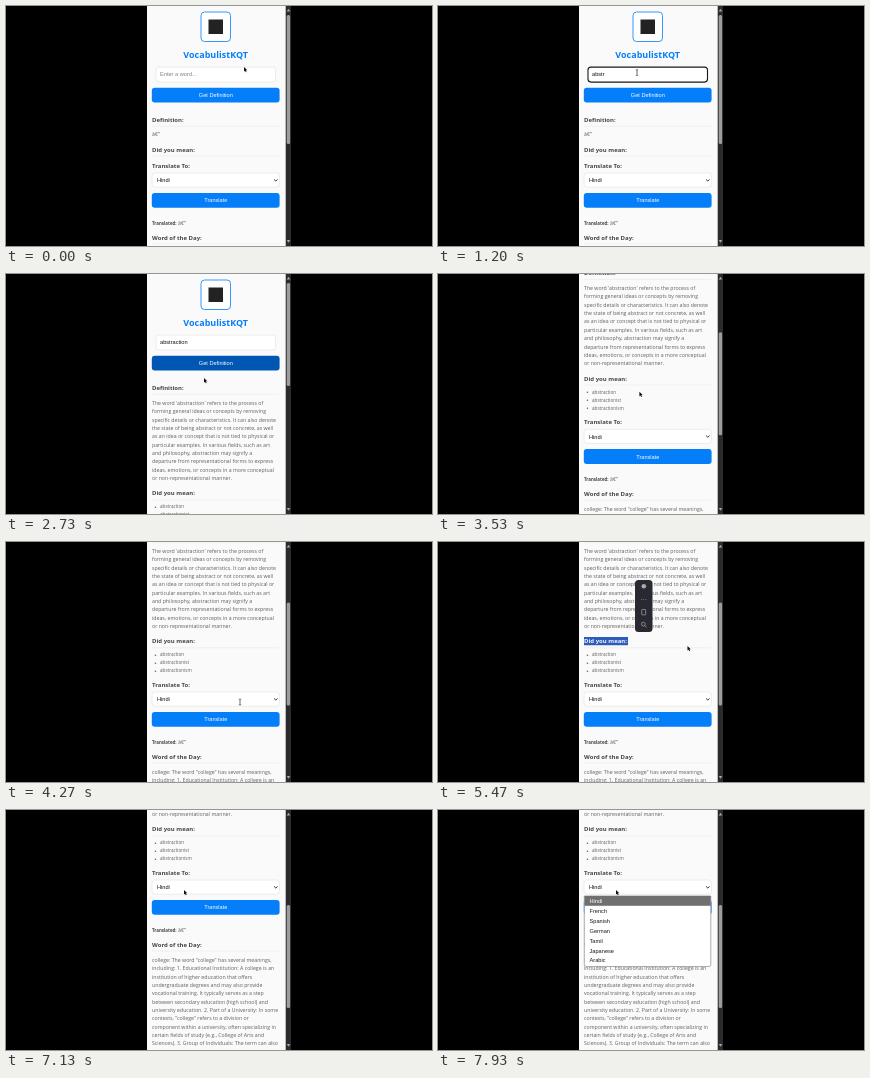
Recreate the animation shown at these times as an HTML page with a canvas. Size 426 px wide and 240 px high, loop 8000 ms.

```html
<!DOCTYPE html>
<html lang="en">
<head>
<meta charset="utf-8">
<title>Dictionary page demo</title>
<style>
html, body { margin: 0; width: 100%; height: 100%; overflow: hidden; background: #000; }
canvas { display: block; width: 426px; height: 240px; }
</style>
</head>
<body>
<canvas id="stage" width="426" height="240"></canvas>
<script>
const ctx = document.getElementById('stage').getContext('2d');
const LOOP = 8000;
const SANS = '"Open Sans", "Noto Sans", sans-serif';
const ARIAL = '"Liberation Sans", Arial, sans-serif';
const BLUE = '#057ef9', GREY = '#5e5e60', DARK = '#444446', BORDER = '#e6e6dc';
const BODY_SIZE = 5.22, LINE = 8.35;
const EMPTY = '\u00e2\u20ac\u201d';

const definition = [
  "The word 'abstraction' refers to the process of",
  'forming general ideas or concepts by removing',
  'specific details or characteristics. It can also denote',
  'the state of being abstract or not concrete, as well',
  'as an idea or concept that is not tied to physical or',
  'particular examples. In various fields, such as art',
  'and philosophy, abstraction may signify a',
  'departure from representational forms to express',
  'ideas, emotions, or concepts in a more conceptual',
  'or non-representational manner.'
];
const wordOfDay = [
  'college: The word "college" has several meanings,',
  'including: 1. Educational Institution: A college is an',
  'institution of higher education that offers',
  'undergraduate degrees and may also provide',
  'vocational training. It typically serves as a step',
  'between secondary education (high school) and',
  'university education. 2. Part of a University: In some',
  'contexts, "college" refers to a division or',
  'component within a university, often specializing in',
  'certain fields of study (e.g., College of Arts and',
  'Sciences). 3. Group of Individuals: The term can also'
];
const suggestions = ['abstraction', 'abstractionist', 'abstractionism'];
const languages = ['Hindi', 'French', 'Spanish', 'German', 'Tamil', 'Japanese', 'Arabic'];

// Keyframes: [time, value, value, ...]
const pointerPath = [
  [0, 238, 61], [130, 238, 61], [480, 199, 66], [1750, 199, 67], [2100, 204, 91],
  [2450, 203, 92], [2700, 198, 104], [3000, 198, 105], [3700, 202, 120], [4200, 234, 160],
  [4350, 234, 160], [4650, 190, 99], [4750, 190, 99], [5050, 147, 99], [5150, 147, 99],
  [5450, 249.5, 104], [5850, 249.5, 105], [6350, 185, 109], [6600, 185, 109],
  [7050, 178, 80], [8000, 178, 80]
];
const scrollPath = [[0, 0], [3050, 0], [3600, 120], [5850, 120], [6150, 200], [8000, 200]];
const hoverPath = [[0, 0], [2030, 0], [2250, 1], [2710, 1], [2950, 0], [8000, 0]];

function at(path, t) {
  const i = Math.max(1, path.findIndex(key => key[0] >= t));
  const [a, b] = [path[i - 1], path[i]];
  const u = (t - a[0]) / (b[0] - a[0]);
  const ease = u * u * (3 - 2 * u);
  return a.slice(1).map((v, k) => v + (b[k + 1] - v) * ease);
}

// Lays text out at ten times its size so that small advances stay fractional.
function text(str, x, y, size, color, { font = SANS, weight = 400, align = 'left' } = {}) {
  ctx.save();
  ctx.translate(x, y + size * 0.36);
  ctx.scale(0.1, 0.1);
  ctx.font = `${weight} ${size * 10}px ${font}`;
  ctx.textAlign = align;
  ctx.fillStyle = color;
  ctx.fillText(str, 0, 0);
  ctx.restore();
}

function box(x, y, w, h, radius, fill, stroke, width = 0.7) {
  ctx.beginPath();
  ctx.roundRect(x, y, w, h, radius);
  if (fill) { ctx.fillStyle = fill; ctx.fill(); }
  if (stroke) { ctx.strokeStyle = stroke; ctx.lineWidth = width; ctx.stroke(); }
}

function shape(points, fill) {
  ctx.beginPath();
  points.forEach(([x, y]) => ctx.lineTo(x, y));
  ctx.closePath();
  ctx.fillStyle = fill;
  ctx.fill();
}

function line(points, color, width) {
  ctx.beginPath();
  points.forEach(([x, y]) => ctx.lineTo(x, y));
  ctx.strokeStyle = color;
  ctx.lineWidth = width;
  ctx.stroke();
}

function paragraph(lines, y) {
  lines.forEach((str, i) => text(str, 146, y + i * LINE, BODY_SIZE, GREY));
}

function heading(str, y) {
  line([[146, y + 6.5], [273, y + 6.5]], '#eeeee8', 0.8);
  text(str, 146, y, 6, DARK, { weight: 700 });
}

function button(label, y, fill = BLUE) {
  box(145.8, y - 7.4, 127.8, 14.8, 3, fill);
  text(label, 209.8, y, 5.6, '#fff', { font: ARIAL, align: 'center' });
}

function header(t) {
  box(195, 6, 29.5, 29.5, 3.5, '#fff', BLUE, 0.8);
  box(202.5, 13.5, 14.5, 14.5, 0, '#222');
  text('VocabulistKQT', 209.7, 48.7, 9, BLUE, { weight: 700, align: 'center' });

  const focused = t >= 500 && t < 2200;
  box(150, 61.1, 119.5, 15, 3, '#fff', focused ? '#181818' : BORDER, focused ? 1.1 : 0.7);
  const typed = 'abstraction'.slice(0, Math.max(0, Math.floor((t - 690) / 95)));
  text(typed || 'Enter a word...', 154, 68.4, 5.65, typed ? '#111' : '#808080', { font: ARIAL });

  const [hover] = at(hoverPath, t);
  button('Get Definition', 89.1, `rgb(${5 - 5 * hover}, ${126 - 40 * hover}, ${249 - 72 * hover})`);
}

function suggestionList(t) {
  const dragged = Math.min(1, (t - 4750) / 300);
  const selected = t > 4750 && t < 5750;
  heading('Did you mean:', 219.3);
  if (selected) {
    ctx.save();
    ctx.beginPath();
    ctx.rect(190 - 44 * dragged, 215, 44 * dragged, 8.5);
    ctx.clip();
    ctx.fillStyle = '#2d5cbb';
    ctx.fillRect(146, 215, 44, 8.5);
    text('Did you mean:', 146, 219.3, 6, '#f4f6ff', { weight: 700 });
    ctx.restore();
  }
  suggestions.forEach((str, i) => {
    const y = 232.8 + i * 8;
    box(148.7, y - 0.4, 1.5, 1.5, 0.75, GREY);
    text(str, 154, y, 4.6, GREY);
  });
}

function translateSection(offset) {
  text('Translate To:', 146, 160 + offset, 6, DARK, { weight: 700 });
  box(146, 167 + offset, 127.5, 14.2, 3, '#fff', BORDER);
  text('Hindi', 151, 174.3 + offset, 5.65, '#111', { font: ARIAL });
  line([[268, 173.4 + offset], [269.8, 175.1 + offset], [271.6, 173.4 + offset]], '#222', 0.9);
  button('Translate', 194.3 + offset);
  text('Translated:', 146, 217 + offset, 4.4, DARK, { weight: 700 });
  text(EMPTY, 172, 217 + offset, BODY_SIZE, GREY);
  heading('Word of the Day:', 231.5 + offset);
  paragraph(wordOfDay, 247.1 + offset);
}

function dropdown() {
  box(146.3, 86, 126.5, 70.5, [0, 0, 2, 2], '#fff', '#8a8a8a');
  ctx.fillStyle = '#707070';
  ctx.fillRect(146.5, 86, 126.2, 9.8);
  languages.forEach((name, i) =>
    text(name, 151.5, 91 + i * 9.9, 5.65, i ? '#161616' : '#fff', { font: ARIAL }));
}

function selectionMenu() {
  const ink = '#a9a9b0';
  box(197, 38, 17.5, 52, 3.5, '#292a31');
  box(203.5, 42, 4.6, 4.6, 2.3, ink);
  [203.3, 205.4, 207.5].forEach(x => box(x, 57, 0.9, 0.9, 0.4, ink));
  box(203.7, 67.5, 4, 5.4, 0.7, null, ink);
  box(203.4, 80.2, 3.8, 3.8, 1.9, null, ink);
  line([[206.7, 83.4], [208.5, 85.3]], ink, 0.8);
}

function scrollbar(scroll, thumb) {
  ctx.fillStyle = '#2b2b2d';
  ctx.fillRect(279.7, 0, 5.3, 240);
  box(280.7, 9 + scroll * 0.43, 3.4, thumb, 1.5, '#9c9c9c');
  shape([[282.5, 2.8], [284.3, 5.6], [280.7, 5.6]], '#a5a5a5');
  shape([[280.7, 234], [284.3, 234], [282.5, 236.8]], '#a5a5a5');
}

function pointer(x, y, beam) {
  if (beam) {
    line([[x, y - 2.8], [x, y + 2.8]], '#333', 0.7);
    line([[x - 1.2, y - 2.8], [x + 1.2, y - 2.8]], '#333', 0.6);
    line([[x - 1.2, y + 2.8], [x + 1.2, y + 2.8]], '#333', 0.6);
    return;
  }
  const outline = [[0, 0], [0, 4.6], [1.1, 3.7], [1.8, 5.3], [2.6, 4.9], [1.9, 3.3], [3.3, 3.2]];
  shape(outline.map(([dx, dy]) => [x + dx, y + dy]), '#111');
}

function draw(t) {
  const found = t >= 2500;
  const [scroll] = at(scrollPath, t);
  const [x, y] = at(pointerPath, t);

  ctx.fillStyle = '#000';
  ctx.fillRect(0, 0, 426, 240);
  ctx.save();
  ctx.beginPath();
  ctx.rect(141, 0, 139, 240);
  ctx.clip();
  ctx.fillStyle = '#fafafa';
  ctx.fillRect(141, 0, 139, 240);
  ctx.translate(0, -scroll);
  header(t);
  heading('Definition:', 113.7);
  if (found) {
    paragraph(definition, 129);
    suggestionList(t);
  } else {
    text(EMPTY, 146, 128.5, BODY_SIZE, GREY);
    heading('Did you mean:', 143.5);
  }
  translateSection(found ? 103 : 0);
  ctx.restore();

  if (t >= 5200 && t < 5750) selectionMenu();
  if (t >= 7250) dropdown();
  scrollbar(scroll, found ? 103 : 129);
  pointer(x, y, (t > 380 && t < 1900) || (t > 4000 && t < 5250));
}

function tick(now) {
  draw(now % LOOP);
  requestAnimationFrame(tick);
}
draw(0);
requestAnimationFrame(tick);
</script>
</body>
</html>
```
